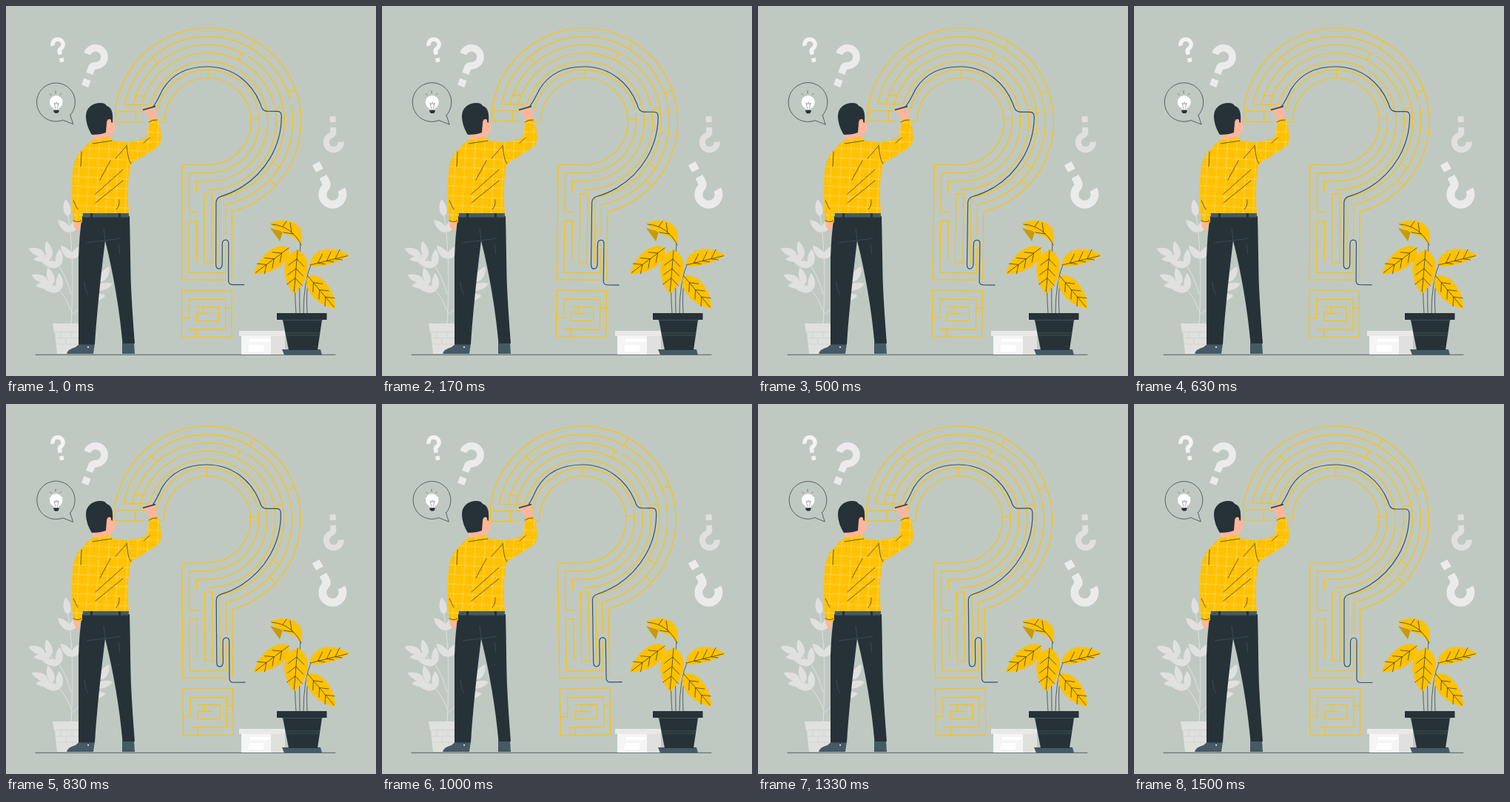
An HTML page that plays this animation: 500 px wide and 500 px high, repeating every 1540 ms.

```html
<!DOCTYPE html>
<html lang="en">
<head>
<meta charset="utf-8">
<title>Question maze</title>
<style>
  html, body { margin: 0; width: 100%; height: 100%; overflow: hidden; background: #bfc9c2; }
  svg { display: block; width: 100vw; height: 100vh; }
  .maze { fill: none; stroke: #ffc100; stroke-width: 1.2; }
  .ink { fill: none; stroke: #263238; stroke-width: .7; stroke-linecap: round; stroke-linejoin: round; }
  .route { fill: none; stroke: #37505c; stroke-width: 1.2; stroke-linecap: round; }
  .skin { fill: #ffb59a; }
  .dark { fill: #263238; }
  .steel { fill: #455a64; }
  .sun { fill: #ffc100; }
  .pale { fill: #e0e1df; }
  .twig { fill: none; stroke: #e0e1df; }
</style>
</head>
<body>
<svg viewBox="0 0 500 500">
  <defs>
    <g id="q">
      <path d="M-20-22A20 20 0 1 1 7-3.5Q0-1 0 6V18" fill="none" stroke="currentColor" stroke-width="16"/>
      <rect x="-8" y="32" width="16" height="16" fill="currentColor"/>
    </g>
    <pattern id="check" width="13" height="13" patternUnits="userSpaceOnUse" patternTransform="rotate(3)">
      <path d="M0 4H13M6 0V13" stroke="#ffe9a8" stroke-width=".5"/>
    </pattern>
    <path id="shirt" d="M117 181L141 177L144 182L162 184Q180 183 190 178L194 154L204 152Q209 161 210 178Q209 187 204 191L169 213C164 232 164 260 166 280H103V292Q97 295 91 291C88 270 88 235 91 217Q95 199 103 195Q110 185 117 181Z"/>
  </defs>

  <g color="#ebebeb">
    <use href="#q" transform="translate(71.9 59.5) rotate(-14) scale(.35)" color="#f3f3f3"/>
    <use href="#q" transform="translate(116.5 81.2) rotate(20) scale(.6)"/>
    <use href="#q" transform="translate(434.2 241.4) rotate(151.6) scale(.68)"/>
    <use href="#q" transform="translate(442.4 173) rotate(178) scale(.5)" color="#e0e1df"/>
  </g>

  <g id="bubble">
    <path class="ink" d="M87 147.500L91 160L77 154.400A26.200 26.200 0 1 1 87 147.500"/>
    <circle cx="67.700" cy="130" r="9" fill="#fff"/>
    <path d="M64 136H72L71 141H65Z" fill="#fff"/>
    <path class="dark" d="M64.400 140.500H71.600V143L70 145H66L64.400 143Z"/>
    <path class="ink" style="stroke-width:.4" d="M67 139L65 131L67 133L68 130L69.500 133L71 131L69.500 139"/>
    <path class="ink" style="stroke-width:.5" d="M59.500 118.500L61 120.500M67 114.500V118M74.500 118.500L73.500 120"/>
  </g>

  <g id="maze">
    <path id="walls" class="maze"/>
    <path class="route" d="M197 138C203 132 207 121 212 112C225 91 246 82 272 82C307 82 332 104 343 131C345 138 347 142 353 142H367Q372 142 372 149C372 190 350 225 318 245C306 252 298 255 291 257Q284 259 284 266V349Q284 355 288 355T292.500 349V322Q292.500 316 297 316T301 322V371Q301 376 306 376.500H322"/>
  </g>

  <path class="ink" d="M40 471.300H445"/>

  <g id="fern"></g>
  <path class="pale" d="M63 429H111L109 441H107L104 470H69L66 441H65Z"/>
  <path d="M66 440.500H109M68 449H107M69 457H106M74 441V449M89 441V449M81 449V457" fill="none" stroke="#cbd0cc" stroke-width=".8"/>

  <g>
    <path class="skin" d="M91 286L102 290L98 305Q93 303 91 294Z"/>
    <path class="steel" d="M100 456H120L118 470H82Q83 464 94 461ZM157 455H173L174 470H157Z"/>
    <circle cx="111" cy="461" r="1" fill="#fff"/>
    <path class="dark" d="M103 284H167C168 320 168 350 169 380Q171 420 174 456H157.500C154 415 146 365 134 317C130 350 124 400 120 457.500H98V340Q99 308 103 284Z"/>
    <path class="steel" d="M104 279.500H166V285.500H103.500Z"/>
    <path class="dark" d="M114 279H117V286H114ZM152 279H155V286H152Z"/>
    <path d="M109 320Q120 318 133 317L155 314M106 372Q107 385 111 391M152 322L154 336M134 317L132 300" fill="none" stroke="#4a5a62" stroke-width=".6"/>

    <path class="skin" d="M116 165L139 160L141 181L118 184Z"/>
    <path class="skin" d="M133 146L143 149L147 159Q148 171 143 173L132 176Z"/>
    <path class="dark" d="M116 174C112 168 108 158 108 149C108 138 116 131 128 131Q134 131 136 135C143 137 145 144 144 158L141 156Q137 150 136 158L135 171Q128 174 116 174Z"/>
    <path class="skin" d="M136.500 158Q138 150 142 154Q143 159 139 163Z"/>

    <path class="skin" d="M194 155L191 147L187 143L186 139L191 138L195 134L201 138L203 143L204 154Z"/>
    <path d="M185 140.300L202 135.700" stroke="#37474f" stroke-width="1.8"/>
    <use href="#shirt" class="sun"/>
    <use href="#shirt" fill="url(#check)"/>
    <path class="ink" d="M117 186Q130 184 143 182M102 197L101 217M163 188L165 203Q166 209 169 213M162 190L148 206M141 209L127 235M158 221L121 254M158 236L121 266M153 262Q154 270 149 275M91 290Q97 293 102 290M97 275L91 263M193 157Q199 153 204 154M194 178L186 185"/>
  </g>

  <path d="M315 439H377V446H315Z" fill="#e8e9e7"/>
  <path d="M318 446H358V471H318Z" fill="#f5f5f5"/>
  <path class="pale" d="M358 446H377V471H358Z"/>
  <path d="M329 450H357V454H329ZM328 458H348V467H328Z" fill="#fff"/>

  <path class="ink" d="M392 415Q390 390 391 372M397 415Q396 350 398 320M402 415Q402 372 413 347M407 415Q405 382 410 366"/>
  <path class="sun" d="M357 294C369 288 382 289 391 294C401 301 401 312 399 323C390 309 377 310 357 294Z"/>
  <path d="M357 300L374 305L370 318Z" fill="#c99a00"/>
  <path class="sun" d="M357 297Q371 299 384 312L374 306Z"/>
  <path class="ink" d="M359 295Q386 297 399 323M374 298L379 291M386 306L384 293M388 308L375 306"/>
  <g id="leaves"></g>
  <path class="steel" d="M373 464H425L427 471.500H376Z"/>
  <path class="dark" d="M366 415H433.500V424H427L421 465H382L374 424H366Z"/>
  <path d="M373 424.500H428M378 442H424M379 445H423" stroke="#53656e" stroke-width=".6"/>
</svg>
<script>
  const byId = id => document.getElementById(id);
  const TAU = 2 * Math.PI, LOOP = 1540;

  // Maze: concentric rings whose walls turn down into the stem.
  const CX = 272.5, CY = 156, INNER = 58.5, LANE = 11.25;
  const LEFT = 238, RIGHT = 305.5, STEP = 9.7;
  const radius = i => INNER + LANE * i;
  const polar = (r, a) => `${(CX + r * Math.cos(a)).toFixed(1)} ${(CY + r * Math.sin(a)).toFixed(1)}`;
  const arc = (r, a, b) => `M${polar(r, a)}A${r} ${r} 0 ${+(b - a > Math.PI)} 1 ${polar(r, b)}`;
  const tick = (lane, turn) => `M${polar(radius(lane), turn * TAU)}L${polar(radius(lane + 1), turn * TAU)}`;

  function mazePath() {
    let d = '';
    for (let i = 0; i <= 6; i++) {
      const r = radius(i), x = RIGHT - (6 - i) * 8.5;
      const end = i < 4 ? TAU / 4 : Math.acos((x - CX) / r);
      const start = Math.PI + (i && .2);
      if (i % 6) {
        const gap = TAU * (i % 2 ? .96 : .83);
        d += arc(r, start, gap) + arc(r, gap + 5 / r, TAU + end);
      } else {
        d += arc(r, start, TAU + end);
      }
      if (i < 3) d += `H${LEFT + i * STEP}V${[370, 278, 252][i]}`;
      if (i > 3) d += `V${[348, 311, 370][i - 4]}`;
    }
    // Radial walls, as lane and fraction of a turn.
    for (const [lane, turn] of [[0, .75], [0, .992], [3, .97], [3, .822], [5, .834], [5, .944], [4, .636], [4, .09], [5, .12]]) {
      d += tick(lane, turn);
    }
    return d +
      'M148 131V157H186M204 157H214M160 134H193M150 143H190M174 122H187M175 143V157' +
      `M${LEFT} 370H297M247.500 278.500H258M247.500 290.500H258V345M247.500 290.500V360.500H297V322` +
      'M268 347V254H278.500V347H268' +
      `M${LEFT} 384.500H${RIGHT}V447.500H${LEFT}Z` +
      'M238 422H248V396.500H297V437H248M297 408H305M258 437V447M258 406.500H288V425.500H258V415.500H278M267 406V416';
  }
  byId('walls').setAttribute('d', mazePath());

  // A pointed leaf between two points; a and b are the bulges of its two sides.
  function leaf(x0, y0, x1, y1, a, b = a) {
    const dx = x1 - x0, dy = y1 - y0, len = Math.hypot(dx, dy);
    const at = (u, v) => `${(x0 + dx * u - dy / len * v).toFixed(1)} ${(y0 + dy * u + dx / len * v).toFixed(1)}`;
    let veins = `M${at(0, 0)}L${at(.95, 0)}`;
    for (const u of [.2, .42, .64]) {
      veins += `M${at(u + .16, a * .5)}L${at(u, 0)}L${at(u + .16, -b * .5)}`;
    }
    const body = `M${at(0, 0)}C${at(.1, a)} ${at(.65, a)} ${at(1, 0)}C${at(.65, -b)} ${at(.1, -b)} ${at(0, 0)}Z`;
    return { body, veins };
  }

  byId('leaves').innerHTML = [
    leaf(382, 327, 335, 362, 17), leaf(394, 330, 389, 389, 21),
    leaf(411, 350, 464, 337, 7, 21), leaf(408, 365, 445, 409, 17)
  ].map(l => `<path class="sun" d="${l.body}"/><path class="ink" d="${l.veins}"/>`).join('');

  // A curved twig with paired leaves and one at its tip.
  function twig(y0, cx, cy, x1, y1) {
    const x0 = 88;
    let out = `<path class="twig" d="M${x0} ${y0}Q${cx} ${cy} ${x1} ${y1}"/>`;
    const sprout = (u, turn) => {
      const mix = (p, c, q) => (1 - u) ** 2 * p + 2 * u * (1 - u) * c + u * u * q;
      const slope = (p, c, q) => (1 - u) * (c - p) + u * (q - c);
      const a = Math.atan2(slope(y0, cy, y1), slope(x0, cx, x1)) + turn;
      const x = mix(x0, cx, x1), y = mix(y0, cy, y1);
      out += `<path class="pale" d="${leaf(x, y, x + 23 * Math.cos(a), y + 23 * Math.sin(a), 6.5).body}"/>`;
    };
    for (const u of [.55, .82]) for (const turn of [-.7, .7]) sprout(u, turn);
    sprout(1, 0);
    return out;
  }
  byId('fern').innerHTML = twig(429, 93, 340, 84, 284) + twig(390, 76, 345, 52, 336) +
    twig(412, 76, 380, 56, 372) + twig(418, 112, 400, 128, 372);

  const maze = byId('maze'), bubble = byId('bubble');
  const start = performance.now();
  function draw() {
    const t = Math.max(0, performance.now() - start) % LOOP;
    const angle = Math.sin(TAU * (t + 40) / LOOP);
    // The bubble swells, shrinks, then rests until the loop ends.
    const size = .99 + .022 * Math.sin(TAU * Math.min(t, 1090) / 1500);
    maze.setAttribute('transform', `rotate(${angle.toFixed(4)} 272 238)`);
    bubble.setAttribute('transform', `translate(67.5 130) scale(${size.toFixed(4)}) translate(-67.5 -130)`);
    requestAnimationFrame(draw);
  }
  draw();
</script>
</body>
</html>
```
